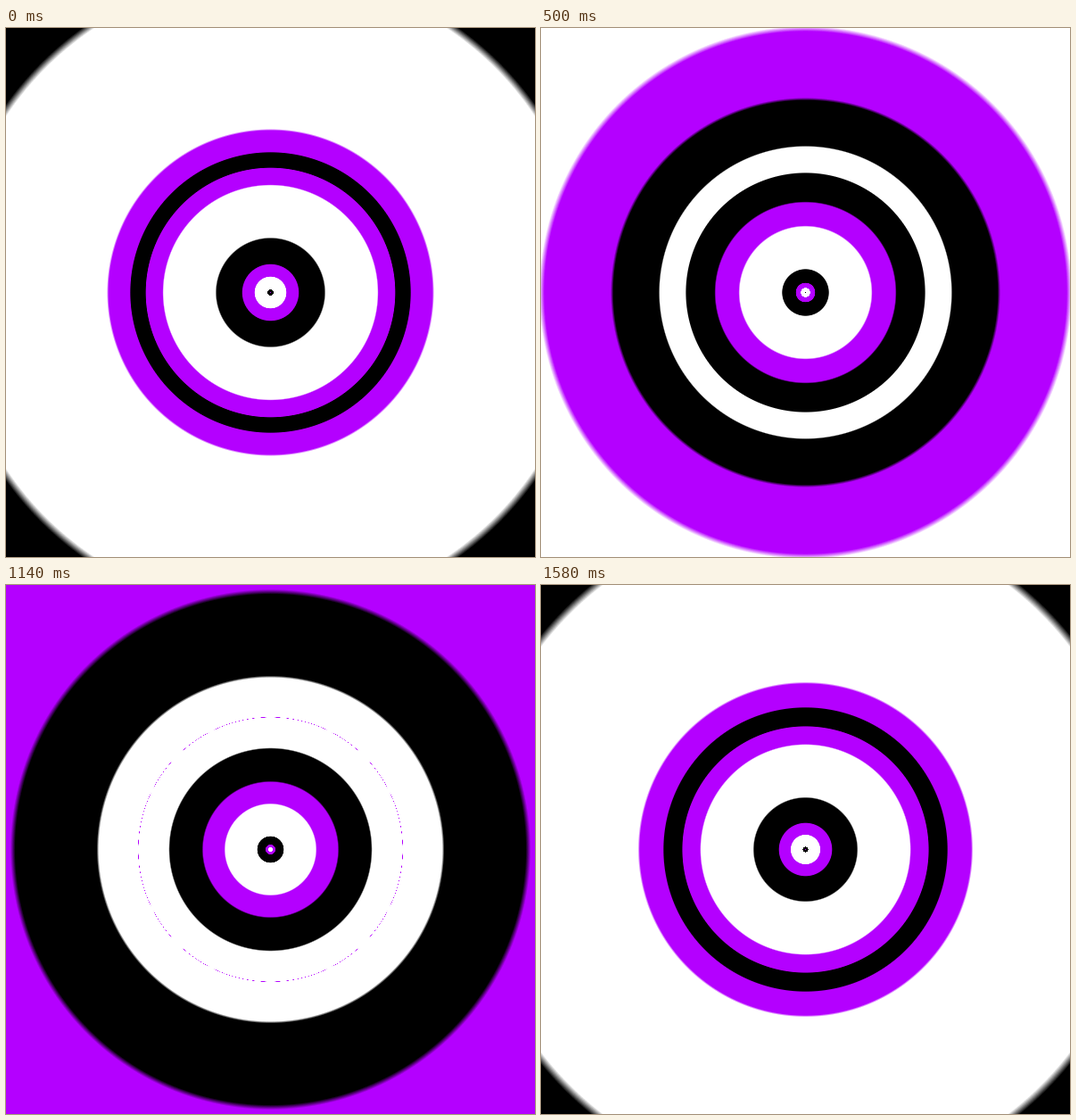
Write an HTML page with a canvas that moves like this. It is 593x593 px and loops after 1600 ms.

```html
<!DOCTYPE html>
<html lang="en">
<head>
<meta charset="utf-8">
<title>Mirrored rings</title>
<style>
  html, body { margin: 0; width: 100%; height: 100%; overflow: hidden; background: #fff; }
  canvas { display: block; width: 593px; height: 593px; }
</style>
</head>
<body>
<canvas id="stage" width="593" height="593"></canvas>
<script>
const SIZE = 593, SEAM = SIZE / 4, PERIOD = 800;
const STEPS = 4096, SOFT = 0.006;
const BLACK = [0, 0, 0], PURPLE = [180, 0, 255], WHITE = [255, 255, 255];

// Where each band begins along one period, in depth units.
const bands = [
  { at: 0.243, color: PURPLE },
  { at: 0.457, color: WHITE },
  { at: 0.943, color: BLACK }
];

function colorAt(s) {
  let color = BLACK;
  for (const band of bands) {
    const k = Math.min(1, Math.max(0, (s - band.at) / (2 * SOFT) + 0.5));
    color = color.map((c, i) => c + (band.color[i] - c) * k);
  }
  return color.map(Math.round);
}

const palette = Uint32Array.from({ length: STEPS }, (_, i) => {
  const [r, g, b] = colorAt((i + 0.5) / STEPS);
  return (255 << 24 | b << 16 | g << 8 | r) >>> 0;
});

// Depth grows with the log distance from the seam circle, both inward and outward.
const depth = new Float32Array(SIZE * SIZE);
const mid = (SIZE - 1) / 2;
for (let y = 0, i = 0; y < SIZE; y++) {
  for (let x = 0; x < SIZE; x++, i++) {
    const r = Math.max(0.5, Math.hypot(x - mid, y - mid));
    depth[i] = Math.sqrt(Math.abs(Math.log(r / SEAM))) * STEPS;
  }
}

const ctx = document.getElementById("stage").getContext("2d");
const image = ctx.createImageData(SIZE, SIZE);
const pixels = new Uint32Array(image.data.buffer);

function draw(time) {
  const shift = (time % PERIOD) / PERIOD * STEPS;
  for (let i = 0; i < pixels.length; i++) {
    pixels[i] = palette[(depth[i] + shift) & (STEPS - 1)];
  }
  ctx.putImageData(image, 0, 0);
}

const start = performance.now();
function tick(now) {
  draw(Math.max(0, now - start));
  requestAnimationFrame(tick);
}
draw(0);
requestAnimationFrame(tick);
</script>
</body>
</html>
```
